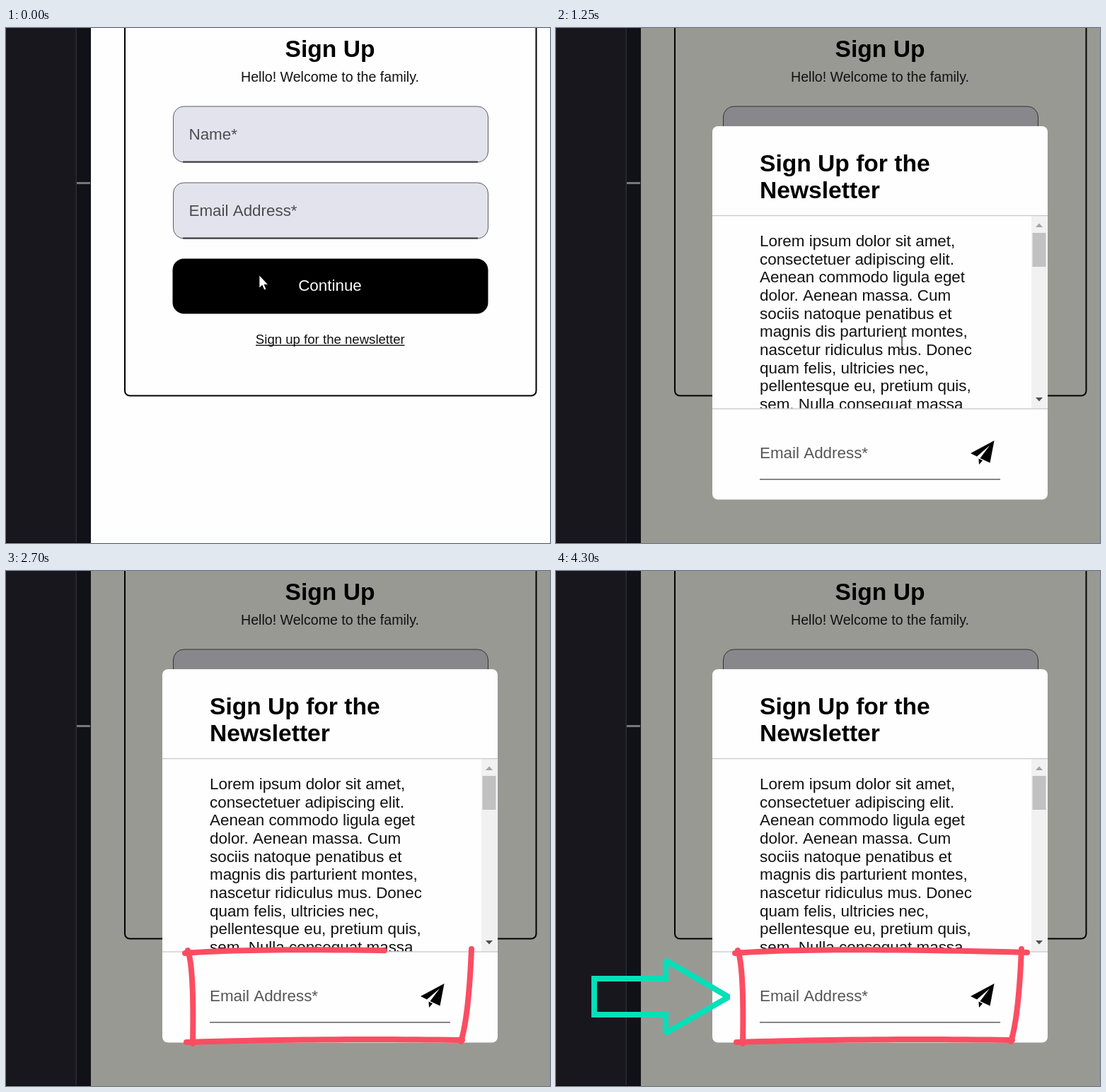
Animation of 769 by 729 pixels, one loop 5100 ms. Source, as an HTML page with a canvas:

```html
<!DOCTYPE html>
<html lang="en">
<head>
<meta charset="utf-8">
<style>
html, body { margin: 0; width: 100%; height: 100%; overflow: hidden; background: #fefefe; }
canvas { display: block; }
</style>
</head>
<body>
<canvas id="stage" width="769" height="729"></canvas>
<script>
const ctx = document.getElementById('stage').getContext('2d');
const LOOP = 5100, STEP = 50;
const MODAL_AT = 1250;
const FONT = '"Liberation Sans", Arial, sans-serif';
const clamp = v => Math.max(0, Math.min(1, v));
const ramp = (t, from, to) => clamp((t - from) / (to - from));

const BODY = [
  'Lorem ipsum dolor sit amet,', 'consectetuer adipiscing elit.',
  'Aenean commodo ligula eget', 'dolor. Aenean massa. Cum',
  'sociis natoque penatibus et', 'magnis dis parturient montes,',
  'nascetur ridiculus mus. Donec', 'quam felis, ultricies nec,',
  'pellentesque eu, pretium quis,', 'sem. Nulla consequat massa'
];

function rect(x, y, w, h, color) {
  ctx.fillStyle = color;
  ctx.fillRect(x, y, w, h);
}

function round(x, y, w, h, r, fill, stroke, width = 1) {
  ctx.beginPath();
  ctx.roundRect(x, y, w, h, r);
  if (fill) { ctx.fillStyle = fill; ctx.fill(); }
  if (stroke) { ctx.strokeStyle = stroke; ctx.lineWidth = width; ctx.stroke(); }
}

function text(str, x, y, size, color, align = 'left', weight = 'normal') {
  ctx.font = `${weight} ${size}px ${FONT}`;
  ctx.textAlign = align;
  ctx.fillStyle = color;
  ctx.fillText(str, x, y);
}

function polygon(pts, color) {
  ctx.beginPath();
  pts.forEach(p => ctx.lineTo(...p));
  ctx.closePath();
  ctx.fillStyle = color;
  ctx.fill();
}

// Quadratic curve as a list of points
function curve(a, b, c, n = 24) {
  return Array.from({ length: n + 1 }, (_, i) => {
    const u = i / n, v = 1 - u;
    return [0, 1].map(k => v * v * a[k] + 2 * u * v * b[k] + u * u * c[k]);
  });
}

const dist = (a, b) => Math.hypot(b[0] - a[0], b[1] - a[1]);
const lengthOf = pts => pts.slice(1).reduce((s, p, i) => s + dist(pts[i], p), 0);

// Strokes the first `len` pixels of a polyline
function trace(pts, len) {
  if (len <= 0) return;
  ctx.beginPath();
  ctx.moveTo(...pts[0]);
  for (let i = 1; i < pts.length && len > 0; i++) {
    const a = pts[i - 1], b = pts[i], d = dist(a, b), u = Math.min(1, len / d);
    ctx.lineTo(a[0] + (b[0] - a[0]) * u, a[1] + (b[1] - a[1]) * u);
    len -= d;
  }
  ctx.stroke();
}

const FRAME = [
  curve([257, 537], [266, 562], [264, 669]),
  curve([255, 667], [450, 661], [645, 664]),
  curve([643, 666], [654, 632], [658, 535]),
  curve([253, 541], [365, 532], [666, 540])
];
const FRAME_LEN = FRAME.reduce((s, p) => s + lengthOf(p), 0);
const ARROW = [[155, 581], [155, 551], [244, 603], [155, 654], [155, 628], [54, 628], [54, 577], [159, 577]];
const ARROW_LEN = lengthOf(ARROW);

function sidebar() {
  rect(0, 0, 120, 729, '#18171d');
  rect(100, 0, 20, 729, '#111118');
  rect(98.5, 0, 1.5, 729, '#2b2b31');
  rect(100, 218, 19, 3, '#77777a');
  rect(0, 728, 120, 1, '#08080c');
}

function field(y, label, dim) {
  round(236.5, y + .5, 445, 79, 15, dim ? '#88888c' : '#e2e3ec', dim ? '#333335' : '#5c5c60');
  rect(250, y + 78, 417, 2, dim ? '#1c1c1e' : '#38383c');
  text(label, 258.5, y + 47, 22.4, '#4c4c50');
}

function page(t, dim) {
  rect(120, 0, 649, 729, dim ? '#999993' : '#fefefe');
  round(168, -20, 581.5, 540.5, 7, null, '#000', 2);
  text('Sign Up', 458, 41, 33.6, '#000', 'center', 'bold');
  text('Hello! Welcome to the family.', 458, 76, 19.6, '#111', 'center');
  field(110.5, 'Name*', dim);
  field(218.5, 'Email Address*', dim);
  const hover = ramp(t, 250, 400) * (1 - ramp(t, 600, 800));
  round(235.5, 326.5, 446, 78, 16, `rgb(${22 * hover},${22 * hover},${20 * hover})`);
  text('Continue', 458, 372, 22.4, '#fefefe', 'center');
  text('Sign up for the newsletter', 458.3, 447, 18.6, '#111', 'center');
  if (t < 550) rect(353, 448.5, 210.5, 1.4, '#111');
}

function modal() {
  round(221, 139, 474, 528.5, 8, '#fefefe');
  text('Sign Up for the', 288, 203, 33.6, '#000', 'left', 'bold');
  text('Newsletter', 288, 241, 33.6, '#000', 'left', 'bold');

  ctx.save();
  ctx.beginPath();
  ctx.rect(221, 266, 474, 272.5);
  ctx.clip();
  BODY.forEach((line, i) => text(line, 288, 309 + i * 25.68, 22.4, '#111'));
  rect(672, 266, 22.5, 273, '#f1f1f2');
  rect(673.5, 290, 19, 48, '#c1c1c1');
  polygon([[678, 282], [688, 282], [683, 276.5]], '#a3a3a3');
  polygon([[678, 523], [688, 523], [683, 528.5]], '#505050');
  ctx.restore();

  rect(221, 265, 474, 1.2, '#c6c6c6');
  rect(221, 538.4, 474, 1.2, '#c6c6c6');
  text('Email Address*', 288, 609, 22.4, '#555');
  rect(288, 638.2, 340, 1.4, '#555');
  polygon([[619.5, 584], [586, 602], [595, 606.5], [613, 591], [599.5, 609], [613.5, 615.5]], '#000');
  polygon([[597.5, 609.5], [598, 618], [603, 612.3]], '#000');
}

function drawPath(x, y, d, fill, stroke, width) {
  ctx.save();
  ctx.translate(x, y);
  const p = new Path2D(d);
  ctx.lineJoin = 'round';
  ctx.lineWidth = width;
  ctx.strokeStyle = stroke;
  if (fill) { ctx.fillStyle = fill; ctx.fill(p); }
  ctx.stroke(p);
  ctx.restore();
}

function pointer(t) {
  const u = 1 - Math.pow(1 - ramp(t, 300, 800), 2.4);
  const x = 358 + 131 * u, y = 350 + 96 * u;
  if (t < 300) {
    drawPath(x, y, 'M0 0V18L4.2 14.2L7 20.8L9.8 19.6L7 13.2H12.5Z', '#fff', '#111', .8);
  } else if (t < 1200) {
    drawPath(x, y, 'M-2 15V2Q-2 0 0 0Q2 0 2 2V9Q4 7 6 9.5Q8 8 9.5 10.5Q12.5 9.5 13 12.5V18Q13 21 11 25H0' +
      'Q-1 22 -5 17Q-6.5 14.5 -4.8 13.6Q-3.4 13 -2 15M2 9V14M6 9.5V14M9.5 10.5V14', '#fefefe', '#222', 1.2);
  } else {
    drawPath(x, y, 'M-3.5 -9H-1L0 -8L1 -9H3.5M0 -8V8M-3.5 9H-1L0 8L1 9H3.5', null, '#222', 1.2);
  }
}

function marks(t) {
  ctx.lineWidth = 8;
  ctx.strokeStyle = '#fb4d62';
  ctx.lineCap = ctx.lineJoin = 'round';
  let left = ramp(t, 2200, 2770) * FRAME_LEN;
  for (const side of FRAME) {
    trace(side, left);
    left -= lengthOf(side);
  }
  ctx.strokeStyle = '#06dfb8';
  ctx.lineCap = 'butt';
  ctx.lineJoin = 'miter';
  ctx.miterLimit = 1.5;
  trace(ARROW, ramp(t, 3050, 3800) * ARROW_LEN);
}

function draw(t) {
  const open = t >= MODAL_AT;
  page(t, open);
  sidebar();
  if (open) modal();
  if (t < 1500) pointer(t);
  marks(t);
}

const start = performance.now();
function tick() {
  const t = (performance.now() - start) % LOOP;
  draw(Math.floor(t / STEP) * STEP);
  requestAnimationFrame(tick);
}
tick();
</script>
</body>
</html>
```
